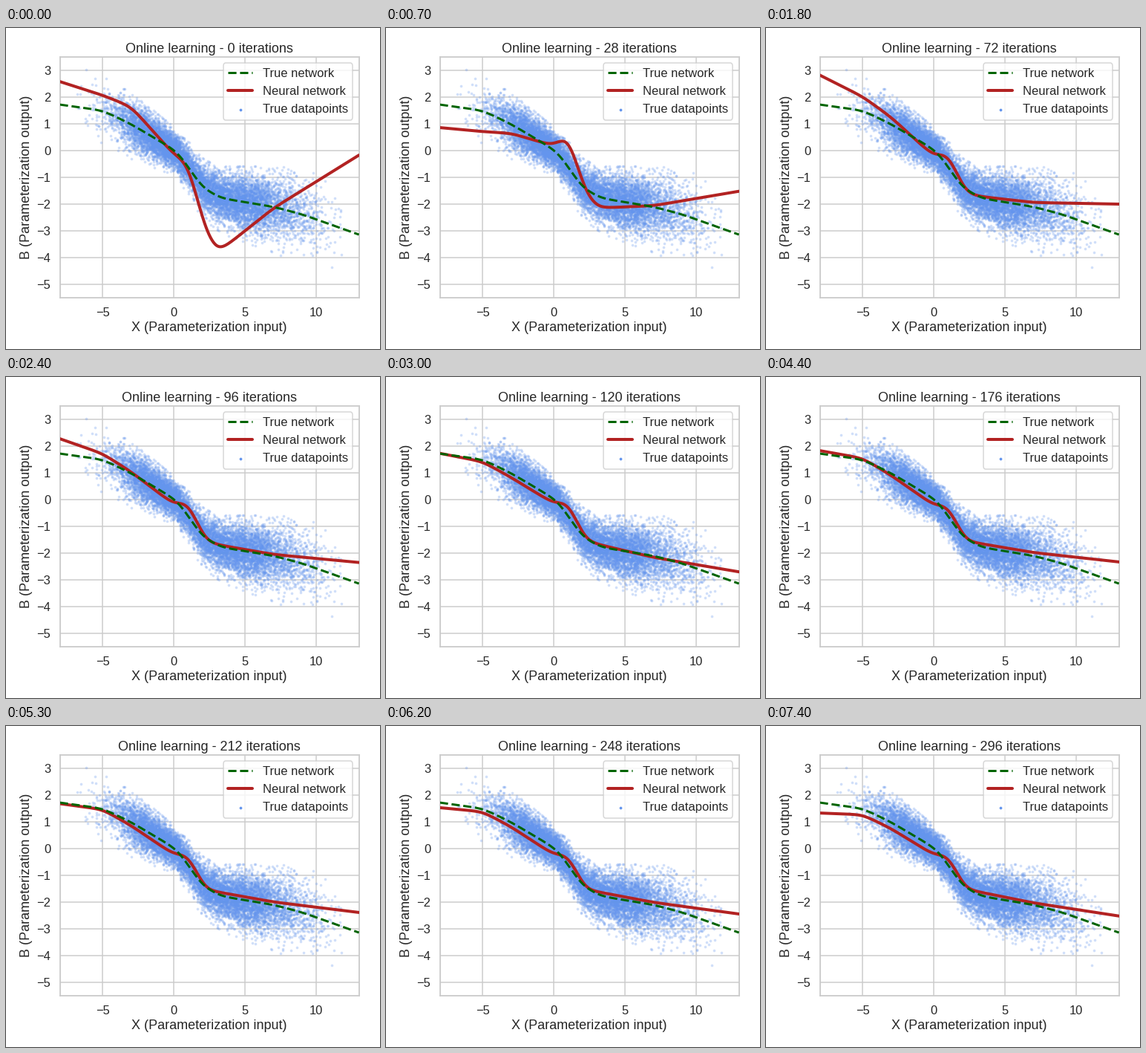
Recreate the animation shown at these times as a matplotlib script. Size 504x432 px, loop 7500 ms.

```python
import numpy as np
import matplotlib.pyplot as plt
from matplotlib.animation import FuncAnimation

W, H, FRAMES, STEP = 504, 432, 75, 100
INK, GRID, BLUE = "0.15", "0.8", "cornflowerblue"

plt.rcParams.update({
    "font.family": "Liberation Sans",
    "text.color": INK, "axes.labelcolor": INK,
    "xtick.color": INK, "ytick.color": INK,
    "axes.edgecolor": GRID, "axes.linewidth": 1.875,
    "axes.titlesize": 18, "axes.labelsize": 18, "axes.labelpad": 5,
    "xtick.labelsize": 16.5, "ytick.labelsize": 16.5,
    "xtick.major.size": 9, "ytick.major.size": 9,
    "xtick.bottom": False, "ytick.left": False,
    "axes.grid": True, "grid.color": GRID, "grid.linewidth": 1.5,
    "axes.axisbelow": True, "legend.fontsize": 16.5,
})


def network(x, cx, cy, soft=.28):
    """Sum of softplus units: a polyline through the corners, rounded off."""
    slopes = np.diff(cy) / np.diff(cx)
    y = cy[0] + slopes[0] * (x - cx[0])
    for c, bend in zip(cx[1:-1], np.diff(slopes)):
        y = y + bend * soft * np.logaddexp(0, (x - c) / soft)
    return y


def truth(x):
    return network(x, [-8, -5, -3, .3, 2, 3.3, 7, 9, 13],
                   [1.72, 1.5, .99, -.05, -1.4, -1.78, -2.1, -2.38, -3.14])


# Corner heights at the turning points of training
CORNERS = [-8, -5, -3, 0, 1, 2.2, 3, 7, 13]
TIMES = [0, 7, 18, 30, 44, 74]
HEIGHTS = np.array([
    [2.58, 2.07, 1.65, -.15, -.4, -3.0, -3.85, -2.15, -.17],
    [.86, .71, .65, .17, .68, -1.6, -2.15, -2.06, -1.52],
    [2.82, 2.02, 1.25, -.22, -.04, -1.6, -1.7, -1.94, -2.0],
    [1.73, 1.42, .83, -.15, -.04, -1.55, -1.66, -2.16, -2.7],
    [1.83, 1.55, .91, -.22, -.18, -1.58, -1.62, -1.98, -2.33],
    [1.33, 1.27, .75, -.24, -.2, -1.55, -1.6, -2.03, -2.52],
])


def fitted(x, frame):
    return network(x, CORNERS, [np.interp(frame, TIMES, h) for h in HEIGHTS.T])


rng = np.random.default_rng(4)
px = np.concatenate([rng.normal(-1, 1.75, 4400), rng.normal(4.3, 2.6, 5600)])
px = px[(px > -6.8) & (px < 12)]
noise = np.clip(rng.normal(size=px.size), -3, 2.7)
py = truth(px) + (.32 + .035 * abs(px)) * noise

fig = plt.figure(figsize=(W / 72, H / 72), dpi=72, facecolor="white")
ax = fig.add_axes([72.6 / W, 1 - 363 / H, 403 / W, 324 / H])
ax.set(xlim=(-8, 13), ylim=(-5.5, 3.5),
       xticks=range(-5, 11, 5), yticks=range(-5, 4),
       xlabel="X (Parameterization input)",
       ylabel="B (Parameterization output)")

xs = np.linspace(-8, 13, 400)
ax.scatter(px, py, s=13, color=BLUE, alpha=.3, linewidths=0, zorder=1)
true_line, = ax.plot(xs, truth(xs), "--", color="darkgreen", lw=3,
                     zorder=4, label="True network")
net_line, = ax.plot(xs, fitted(xs, 0), color="firebrick", lw=4,
                    solid_capstyle="round", zorder=3, label="Neural network")
dot = ax.scatter([], [], s=14, color=BLUE, linewidths=0,
                 label="True datapoints")
legend = ax.legend(handles=[true_line, net_line, dot], loc="upper right",
                   framealpha=.8, edgecolor=GRID, labelspacing=.55)
legend.get_frame().set_linewidth(1.5)
legend.set_zorder(6)
title = ax.set_title("", pad=6)


def update(frame):
    net_line.set_ydata(fitted(xs, frame))
    title.set_text(f"Online learning - {4 * frame} iterations")
    return net_line, title


anim = FuncAnimation(fig, update, frames=FRAMES, interval=STEP,
                     repeat=True, repeat_delay=0, blit=False)
plt.show()
```
